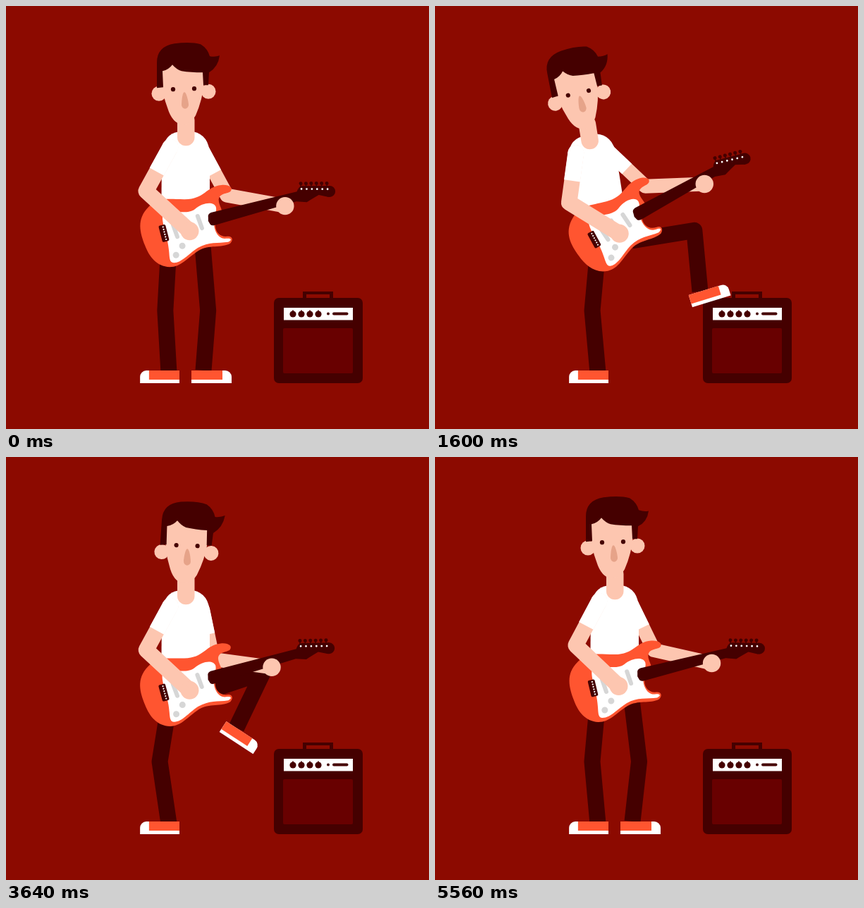
An HTML page with a canvas for the animation above (5600 ms loop, 600 by 600 pixels).

```html
<!DOCTYPE html>
<html lang="en">
<head>
<meta charset="utf-8">
<title>Guitarist</title>
<style>
html, body { margin: 0; width: 100%; height: 100%; overflow: hidden; background: #8c0a00; }
canvas { display: block; }
</style>
</head>
<body>
<canvas id="stage" width="600" height="600"></canvas>
<script>
const ctx = document.getElementById('stage').getContext('2d');
const LOOP = 5600, BEAT = 800;
const RED = '#8c0a00', DARK = '#450000', ORANGE = '#ff5530', SKIN = '#fdc6b0', WHITE = '#fff', GREY = '#d6d6d6';

// time, distance of the fretting hand along the neck
const FRETS = [[0, 108], [1080, 108], [2040, 106], [2720, 89], [3640, 89], [4280, 68], [5560, 104], [LOOP, 108]];

const SHIRT = new Path2D('M245 178Q224 181 221 208L220 330H289V210Q288 183 266 178Z');
const FACE = new Path2D('M221 80V106Q222 126 229 144Q236 167 251 168Q263 167 269 155Q279 132 281 108L284 80Z');
const NOSE = new Path2D('M253 122C256 122 259 136 259 140A5 5.5 0 0 1 249 140C249 136 250 122 253 122Z');
const BODY = new Path2D('M202 284C216 269 230 273 254 273C282 273 284 255 306 253C317 252 323 257 319 262C315 266 303 264 302 274C302 282 308 287 307 297L297 310C297 320 304 327 314 326C321 325 323 331 318 336C305 343 288 337 273 346C256 357 248 369 232 369C213 368 203 354 197 338C190 320 185 301 202 284Z');
const GUARD = new Path2D('M223 293C235 286 256 296 268 287C280 277 295 276 298 284C300 292 294 296 295 306C295 319 302 330 312 329C320 328 321 331 315 334C300 336 288 333 272 342C258 351 249 363 238 363C231 363 232 355 231 346C230 326 219 304 223 293Z');
const NECK = new Path2D('M287 304L290 309Q292 311 296 310L412 277L427 278Q437 272 444 268L458 271L460 255H419Q415 257 413 263L291 292Q286 294 287 299Z');

const rad = a => a * Math.PI / 180;
const clamp = v => Math.max(0, Math.min(1, v));
const smooth = (a, b, t) => { const u = clamp((t - a) / (b - a)); return u * u * (3 - 2 * u); };
const mix = (a, b, u) => a + (b - a) * u;
const wave = (t, peak) => Math.cos(2 * Math.PI * (t / BEAT - peak));
// Bounce with a sharp top and a flat bottom
const bounce = (c, base, size, flat) => base - size * c + flat * (1 - c * c);

function fretAt(t) {
  const i = FRETS.findIndex(k => k[0] > t), [t0, a] = FRETS[i - 1], [t1, b] = FRETS[i];
  return mix(a, b, smooth(t0, t1, t));
}

// Places a point: turn about a pivot, then shift
function turn([x, y], [px, py], angle, dx, dy) {
  const c = Math.cos(rad(angle)), s = Math.sin(rad(angle));
  return [px + dx + (x - px) * c - (y - py) * s, py + dy + (x - px) * s + (y - py) * c];
}

function within(pivot, angle, dx, dy, draw) {
  ctx.save();
  ctx.translate(pivot[0] + dx, pivot[1] + dy);
  ctx.rotate(rad(angle));
  ctx.translate(-pivot[0], -pivot[1]);
  draw();
  ctx.restore();
}

// Middle joint of a two-part limb; side picks the bend direction
function joint(a, b, l1, l2, side) {
  const dx = b[0] - a[0], dy = b[1] - a[1], d = Math.hypot(dx, dy);
  const k = (l1 * l1 - l2 * l2 + d * d) / (2 * d);
  const h = side * Math.sqrt(Math.max(0, l1 * l1 - k * k));
  return [a[0] + (dx * k - dy * h) / d, a[1] + (dy * k + dx * h) / d];
}

function fill(path, color) { ctx.fillStyle = color; ctx.fill(path); }
function disc(x, y, r, color) {
  ctx.fillStyle = color;
  ctx.beginPath();
  ctx.arc(x, y, r, 0, 7);
  ctx.fill();
}
function box(x, y, w, h, color, r = 0) {
  ctx.fillStyle = color;
  ctx.beginPath();
  ctx.roundRect(x, y, w, h, r);
  ctx.fill();
}
function line(points, width, color, cap = 'round') {
  ctx.strokeStyle = color;
  ctx.lineWidth = width;
  ctx.lineCap = cap;
  ctx.lineJoin = 'round';
  ctx.beginPath();
  points.forEach(p => ctx.lineTo(...p));
  ctx.stroke();
}

function amp() {
  box(421, 405, 43, 14, DARK);
  box(426, 409, 33, 5, RED);
  box(380, 414, 126, 121, DARK, 7);
  box(394, 428, 98, 17.5, WHITE);
  for (let x = 407; x < 450; x += 12) {
    disc(x, 437, 4.6, DARK);
    line([[x, 432], [x, 436]], 1.6, DARK);
  }
  disc(457, 436.5, 2, DARK);
  line([[465, 436.5], [483.5, 436.5]], 4, DARK);
  box(393, 457, 99, 64, '#680000', 2);
}

// Heel at the origin, toe to the right
function shoe() {
  box(0, 0, 57, 18, WHITE, [0, 9, 0, 0]);
  box(0, 0, 44, 13, ORANGE);
}

function sleeve(shoulder, elbow, part, width) {
  const end = [mix(shoulder[0], elbow[0], part), mix(shoulder[1], elbow[1], part)];
  line([shoulder, end], width, WHITE, 'butt');
  disc(...shoulder, width / 2, WHITE);
}

function guitarBody() {
  fill(BODY, ORANGE);
  fill(GUARD, WHITE);
  [[237, 309], [254, 301], [272, 297]].forEach(([x, y]) => line([[x, y], [x + 6, y + 17]], 6, GREY));
  disc(250, 339, 4.5, GREY);
  disc(241, 352, 4.5, GREY);
  within([224, 321], -14, 0, 0, () => {
    box(219, 309, 10, 24, DARK, 2);
    for (let i = 0; i < 6; i++) disc(225, 312 + i * 3.6, 1.1, WHITE);
  });
}

function guitarNeck() {
  fill(NECK, DARK);
  disc(459.5, 263, 8, DARK);
  for (let i = 0; i < 6; i++) {
    const x = 418.5 + i * 7.4;
    disc(x, 251.5, 2.5, DARK);
    line([[x, 252], [x, 257]], 1.5, DARK);
    disc(x + 1, 259.3 + i * .1, 1.4, WHITE);
  }
}

// The face nods against the bob; the quiff flaps
function head(dy, flap) {
  const nod = -dy * .28;
  const hair = new Path2D(`M214 116V80Q214 57 239 53Q262 50 276 54Q286 60 289 71
    Q297 ${73 + flap * .6} 303 ${71 + flap}Q301 ${87 + flap * .5} 288 94L287 112H280L279 ${94 + nod}
    Q262 ${94 + nod} 249 ${92 + nod}Q242 ${90 + nod} 236 ${83 + nod}Q231 ${90 + nod} 222 ${92 + nod}L223 115Z`);
  disc(217, 124 + dy * .15, 10.5, SKIN);
  disc(287, 121 + dy * .15, 10.5, SKIN);
  fill(FACE, SKIN);
  fill(hair, DARK);
  ctx.translate(0, nod);
  disc(237, 118, 3.1, DARK);
  disc(267, 117, 3.1, DARK);
  fill(NOSE, '#e6a389');
}

function draw(t) {
  const lean = smooth(500, 1500, t) - smooth(2400, 3100, t);
  const step = smooth(100, 620, t) - smooth(3360, 3920, t);
  const flick = wave(t, .8);
  const dy = bounce(wave(t, .175), 1.25, 10.75, 5) + 4 * lean;
  const hips = [250, 330], shift = -13 * lean;
  const torso = p => turn(p, hips, -9 * lean, shift, dy);

  const hub = [235, 325], gx = 2.5 * lean, gTurn = 2.8 * flick - 1.2 - 14 * lean;
  const gy = bounce(wave(t, .19), -2, 14, 10) + 6 * lean;
  const guitar = p => turn(p, hub, gTurn, gx, gy);

  ctx.fillStyle = RED;
  ctx.fillRect(0, 0, 600, 600);
  amp();

  // Standing leg
  line([[231, 340 + dy], [226 - .7 * dy, 432], [231, 520]], 23, DARK, 'butt');
  ctx.save();
  ctx.translate(246, 517);
  ctx.scale(-.98, 1);
  shoe();
  ctx.restore();

  // Leg that steps on the amp
  const arc = (a, c, b) => (1 - step) ** 2 * a + 2 * step * (1 - step) * c + step * step * b;
  const foot = [arc(280, 326, 376), arc(517, 307, 405)], footTurn = arc(0, 74.5, -17);
  const raised = clamp((517 - foot[1]) / 40);
  const hip = [279, mix(340 + dy, 332 + .2 * dy, raised)];
  const bent = joint(hip, foot, 90, 87, -1);
  const knee = [mix(286.5 + .7 * dy, bent[0], raised), mix(432, bent[1], raised)];
  line([hip, knee, foot], 23, DARK, 'butt');
  within(foot, footTurn, 0, 0, () => {
    ctx.translate(foot[0] - 17, foot[1]);
    shoe();
  });

  // Fretting arm
  const along = rad(-15.2), fret = fretAt(t);
  const fretHand = guitar([
    289 + fret * Math.cos(along) - 11 * Math.sin(along),
    301 + fret * Math.sin(along) + 11 * Math.cos(along)
  ]);
  const shoulderR = torso([279, 205]);
  const elbowR = joint(shoulderR, fretHand, 72, 84, 1);
  line([shoulderR, elbowR, fretHand], 20, SKIN);
  sleeve(shoulderR, elbowR, .5, 20);

  within(hips, -9 * lean, shift, dy, () => {
    fill(SHIRT, WHITE);
    box(243, 150, 24.5, 48, SKIN, 12);
    const tilt = 16 * step * (1 - step) - 2 * lean;
    within([255, 180], tilt, 0, 0, () => head(dy, 7 * flick - 3));
  });

  within(hub, gTurn, gx, gy, () => {
    guitarBody();
    guitarNeck();
  });
  disc(...fretHand, 12.7, SKIN);

  // Strumming arm
  const pick = [260.5 + gx * .5, 318 + gy - 2.5 * lean];
  const shoulderL = torso([233, 200]);
  const elbowL = joint(shoulderL, pick, 71, 84, 1);
  line([shoulderL, elbowL, pick], 22.5, SKIN);
  disc(...pick, 13, SKIN);
  disc(pick[0] + 1, pick[1] - 8, 5, SKIN);
  sleeve(shoulderL, elbowL, .56, 23);
}

const start = performance.now();
function frame() {
  draw((performance.now() - start) % LOOP);
  requestAnimationFrame(frame);
}
frame();
</script>
</body>
</html>
```
